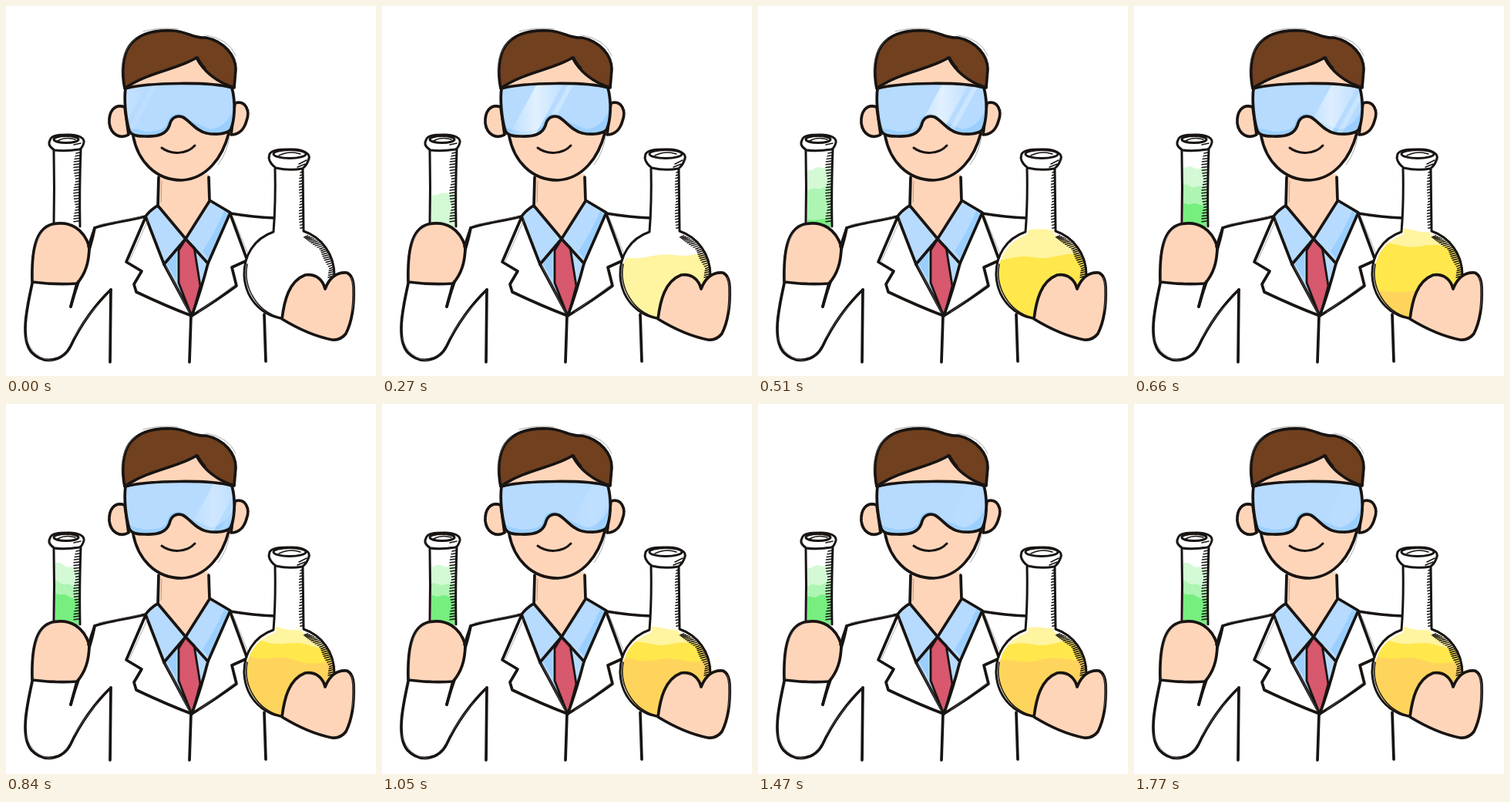
Animation of 480x480 px, one loop 1800 ms. Source, as an HTML page:

```html
<!DOCTYPE html>
<html lang="en">
<head>
<meta charset="utf-8">
<title>Scientist with flasks</title>
<style>
  html, body { margin: 0; width: 100%; height: 100%; overflow: hidden; background: #fff; }
  svg { display: block; width: 100vw; height: 100vh; }
  .ink { fill: none; stroke: #181412; stroke-width: 3.7; stroke-linecap: round; stroke-linejoin: round; }
  .thin { stroke-width: 1.5; }
  .glass { stroke-width: 3; }
  .sketch { fill: none; stroke: #777; stroke-width: 1; stroke-linecap: round; opacity: .6; }
  .skin { fill: #ffd5ba; }
  .blue { fill: #b6dbff; }
  .shade { fill: #9bcfff; }
  .white { fill: #fff; }
</style>
</head>
<body>
<svg viewBox="0 0 480 480" xmlns="http://www.w3.org/2000/svg">
  <defs>
    <path id="goggles" d="M155 107C185 99 266 98 293 106C298 124 297 149 291 161C284 167 269 167 260 165C246 162 239 149 229 144C220 141 214 146 212 155C208 166 198 170 179 169C169 169 162 167 160 162C155 145 153 122 155 107Z"/>
    <clipPath id="lens"><use href="#goggles"/></clipPath>
    <clipPath id="tubeInside"><path d="M64 188H94V292H64Z"/></clipPath>
    <clipPath id="flaskInside"><path d="M350 212H384V296Q424 308 424 350A56 55 0 0 1 312 350Q312 310 350 296Z"/></clipPath>
    <linearGradient id="glint">
      <stop offset="0" stop-color="#fff" stop-opacity="0"/>
      <stop offset=".5" stop-color="#fff" stop-opacity=".6"/>
      <stop offset="1" stop-color="#fff" stop-opacity=".1"/>
    </linearGradient>
  </defs>

  <!-- neck, shirt and tie -->
  <path class="skin" d="M198 218L197 259L233 302L264 254L263 218Z"/>
  <path class="blue" d="M195 259L181 273L206 334L241 402L263 335L291 268L264 252L233 302Z"/>
  <path class="shade" d="M284 264L290 268L264 330L255 318Q272 292 284 264ZM208 333L221 317L221 355Z"/>
  <path fill="#d8586e" d="M233 303L224 317L224 359L240 400L252 363L244 313Z"/>
  <g class="ink">
    <path d="M198 222L197 260M263 222L264 252M233 302L264 253M197 259L233 302M195 260Q186 266 181 273L205 335L233 302L262 334L291 268L264 252"/>
    <path d="M205 335Q224 370 241 402Q253 369 262 334"/>
    <path stroke-width="2.8" d="M232 304L224 317L224 359L240 400M235 305L244 313L252 363L242 400"/>
    <path d="M181 274L156 332L176 344L166 361L169 371Q207 389 241 402Q276 380 299 363L293 339L313 330L291 270"/>
    <path d="M181 273C156 279 126 283 115 288C109 323 93 355 84 390M291 269Q321 274 348 275"/>
    <path d="M240 402L238 462M136 368L135 462M335 400L337 461"/>
  </g>
  <path class="sketch" d="M120 284L176 273M184 278L160 331M207 337L238 398M295 275L317 329M296 362L250 397M202 227L201 255"/>

  <!-- head -->
  <g class="ink">
    <path class="skin" d="M154 131C140 126 133 138 134 152C136 167 148 173 159 167ZM297 126C311 122 317 136 312 149C309 160 302 167 292 167Z"/>
    <path class="skin" d="M155 106C153 128 160 156 165 169C171 200 193 226 228 226C261 224 281 196 289 165L296 106L247 65Z" stroke="none"/>
    <path d="M165 169C171 200 193 226 228 226C261 224 281 196 289 165"/>
    <path stroke-width="3" d="M202 184C214 193 234 193 245 181"/>
    <path fill="#70401f" d="M154 107C150 87 151 65 160 52C172 35 195 31 216 32C235 33 245 43 259 41C284 46 298 65 298 82L296 106C275 99 258 88 247 67C224 82 183 86 154 107Z"/>
    <path class="thin" d="M249 66Q254 76 259 80"/>
  </g>
  <path class="sketch" d="M150 88C149 66 158 50 168 42M178 33Q199 27 223 30M260 38Q289 43 298 64M290 170Q287 190 275 206"/>
  <use href="#goggles" class="blue"/>
  <g clip-path="url(#lens)">
    <path class="shade" d="M298 118Q293 156 265 160L239 149Q232 139 221 140Q211 141 208 155Q202 163 181 163L160 158L160 172H210L214 148Q225 139 240 158L260 168H298Z"/>
    <g id="shine">
      <path fill="url(#glint)" d="M-36 40L8 -40H42L-2 40Z"/>
      <path fill="#fff" opacity=".3" d="M5 40L49 -40H56L12 40Z"/>
    </g>
  </g>
  <use href="#goggles" class="ink"/>

  <!-- test tube -->
  <path class="white" d="M62 183H97V292H62Z"/>
  <g id="tube" clip-path="url(#tubeInside)"></g>
  <g class="ink glass">
    <path d="M62 187Q63 235 62 285M97 186Q95 240 96 286"/>
    <path class="white" d="M57 174C59 167 70 167 81 167C94 167 102 171 101 177Q99 185 95 186Q77 189 63 187Q55 182 56 177Z"/>
    <ellipse cx="78" cy="173" rx="16" ry="4.5"/>
    <path class="thin" d="M67 175Q77 169 90 173M88 180L97 178"/>
  </g>
  <path id="tubeHatch" class="ink thin"/>

  <!-- round flask -->
  <path class="white" d="M349 208H385V294Q426 306 426 350A58 57 0 0 1 309 350Q309 307 349 295Z"/>
  <g id="flask" clip-path="url(#flaskInside)"></g>
  <g class="ink glass">
    <path d="M349 211Q350 255 347 293C321 302 308 325 309 350C311 382 335 406 367 406C402 406 425 382 426 350C426 321 409 300 386 292L385 211"/>
    <path d="M313 335C307 365 326 397 356 404" class="thin"/>
    <path class="white" d="M342 192C346 185 360 186 372 186C386 186 395 192 393 198Q390 208 384 211Q367 214 350 210Q342 204 341 197Z"/>
    <ellipse cx="368" cy="192" rx="21" ry="5.5"/>
    <path class="thin" d="M354 194Q368 187 382 192M380 205L390 200M378 209L388 205"/>
  </g>
  <path id="flaskHatch" class="ink thin"/>

  <!-- hands and sleeve -->
  <g class="ink">
    <path class="skin" d="M34 358C33 321 37 289 60 283C84 278 101 290 108 312C108 331 103 348 92 360Q64 362 34 358Z"/>
    <path d="M34 360C26 396 19 432 33 449C49 466 74 461 84 441C97 413 117 386 136 368M92 360L84 390M115 288L107 312"/>
    <path class="skin" d="M358 406C361 382 367 357 388 349C402 347 411 355 414 367C419 354 428 345 442 346Q450 349 451 364C452 388 449 409 441 425Q434 434 423 433C398 428 376 417 358 406Z"/>
  </g>
  <path class="sketch" d="M26 430Q35 458 60 460M88 430Q103 405 119 388M448 352Q454 368 449 395M39 312Q42 292 57 286"/>
</svg>
<script>
const LOOP = 1800, STEP = 30;
const $ = id => document.getElementById(id);
const clamp = v => Math.max(0, Math.min(1, v));

// Each layer rises between two times, then sloshes around its final level.
const vessels = [
  { id: 'tube', x: 79, half: 17, bottom: 293, tilt: 5, ripple: 1.2, layers: [
    { fill: '#d3fad5', level: 210, start: 0, end: 450 },
    { fill: '#aef5b3', level: 234, start: 270, end: 520 },
    { fill: '#76ee80', level: 249, start: 390, end: 720 }] },
  { id: 'flask', x: 368, half: 60, bottom: 412, tilt: 6, ripple: 2, layers: [
    { fill: '#fff4a0', level: 291, start: 0, end: 370 },
    { fill: '#ffe74c', level: 311, start: 270, end: 550 },
    { fill: '#ffd45c', level: 332, start: 510, end: 800 }] }
];

for (const vessel of vessels) {
  for (const layer of vessel.layers) {
    layer.node = document.createElementNS('http://www.w3.org/2000/svg', 'path');
    layer.node.setAttribute('fill', layer.fill);
    $(vessel.id).append(layer.node);
  }
}

function surface({ x, half, bottom, tilt, ripple }, { level, start, end }, t, index) {
  const rise = clamp((t - start) / (end - start));
  const slosh = Math.cos((t - 840) / 930 * 2 * Math.PI);
  const y = bottom + (level - bottom) * rise;
  let d = `M${x - half} ${bottom + 8}`;
  for (let i = 0; i <= 24; i++) {
    const u = i / 12 - 1;
    const wave = tilt * slosh * u + ripple * Math.sin(u * 6 + index * 2 + slosh * 1.5);
    d += `L${(x + u * half).toFixed(1)} ${(y + wave * rise).toFixed(1)}`;
  }
  return d + `L${x + half} ${bottom + 8}Z`;
}

function hatch() {
  let tube = '', flask = '';
  const jitter = i => Math.abs(Math.sin(i * 12.9)) * 3;
  for (let i = 0; i < 25; i++) {
    const y = 190 + i * 3.7;
    tube += `M96 ${y}L${91 - jitter(i)} ${y + 1}`;
  }
  for (let i = 0; i < 20; i++) {
    const y = 215 + i * 3.8;
    flask += `M385 ${y}L${382 - jitter(i) / 2} ${y + 1}`;
  }
  for (let i = 0; i < 24; i++) {
    const a = -1.15 + i * .05, x = 368 + 58 * Math.cos(a), y = 350 + 57 * Math.sin(a);
    flask += `M${x} ${y}L${x - 5 - jitter(i)} ${y + 2}`;
  }
  $('tubeHatch').setAttribute('d', tube);
  $('flaskHatch').setAttribute('d', flask);
}

function drawShine(t) {
  const x = 145 + 125 * Math.sin(clamp(t / 1000) * Math.PI / 2);
  const fadeIn = .35 + .65 * clamp(t / 200);
  const fadeOut = 1 - .88 * clamp((t - 600) / 500);
  $('shine').setAttribute('transform', `translate(${x} 135)`);
  $('shine').setAttribute('opacity', fadeIn * fadeOut);
}

function draw(t) {
  for (const vessel of vessels) {
    vessel.layers.forEach((layer, i) => layer.node.setAttribute('d', surface(vessel, layer, t, i)));
  }
  drawShine(t);
}

const began = performance.now();
function tick() {
  const t = (performance.now() - began) % LOOP;
  draw(Math.floor(t / STEP) * STEP);
  requestAnimationFrame(tick);
}
hatch();
draw(0);
requestAnimationFrame(tick);
</script>
</body>
</html>
```
